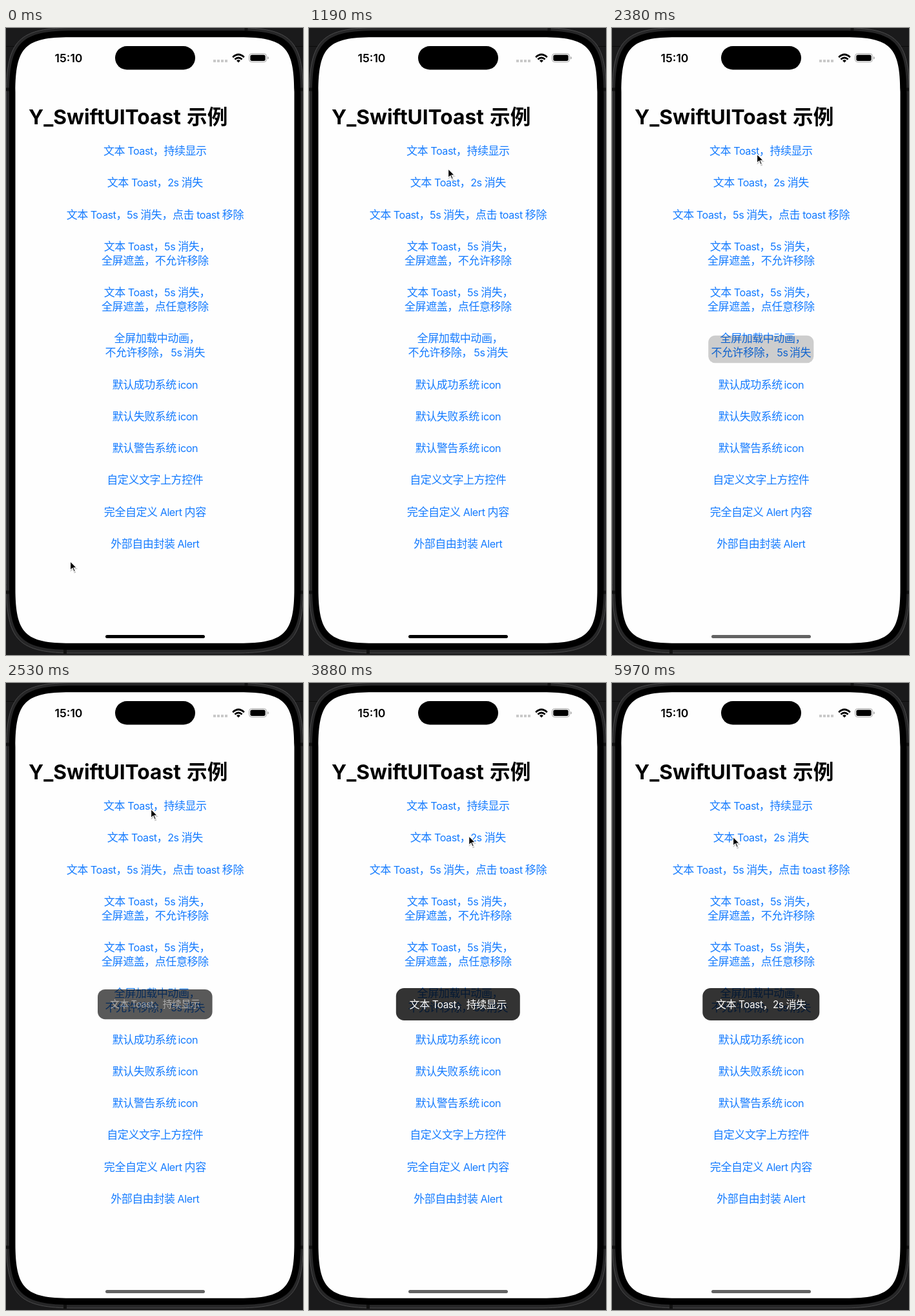
An HTML page that plays this animation: 460 px wide and 970 px high, repeating every 8 s.

```html
<!DOCTYPE html>
<html lang="zh-CN">
<head>
<meta charset="utf-8">
<title>Toast</title>
<style>
html, body { margin: 0; width: 100%; height: 100%; overflow: hidden; background: #1a1a1b; }
svg { display: block; width: 460px; height: 970px; }
text { font-family: "Noto Sans CJK SC", "Noto Sans CJK", sans-serif; white-space: pre; }
.lat { font-family: Inter, sans-serif; font-size: .95em; }
.head { font-weight: 700; font-size: 31.7px; }
.head .lat { font-size: 1em; }
.link { font-size: 17px; letter-spacing: -.45px; fill: #147bff; text-anchor: middle; }
.toast { font-size: 16px; letter-spacing: -.4px; fill: #fff; text-anchor: middle; }
.clock { font-family: Inter, sans-serif; font-weight: 600; font-size: 17.6px; text-anchor: middle; }
</style>
</head>
<body>
<svg viewBox="0 0 460 970">
  <path d="M0 28.5H14M446 28.5H460" stroke="#0c0c0c"/>
  <path id="rim" fill="#262627" stroke="#4b4b4c"/>
  <path d="M0 95H5M456 95H460M0 873H5M456 873H460M372 0V4M91.5 961V968" stroke="#111" stroke-width="5"/>
  <path id="bezel"/>
  <path id="screen" fill="#fefefe"/>
  <rect x="169" y="28" width="124" height="36.5" rx="18.2"/>
  <text class="clock" x="97" y="52.8">15:10</text>
  <path d="M321 51H343" stroke="#c9c9c9" stroke-width="4" stroke-dasharray="4 2"/>
  <g fill="none" stroke="#000" stroke-width="2.7">
    <path d="M351.2 45.2Q360 36.8 368.8 45.2"/>
    <path d="M354.4 48.6Q360 43.4 365.6 48.6"/>
  </g>
  <path d="M357 50.6Q360 48 363 50.6L360 53.6Z"/>
  <rect x="376.5" y="39.7" width="27" height="13" rx="4" fill="none" stroke="#a4a4a4"/>
  <rect x="378.3" y="41.5" width="23.4" height="9.4" rx="2.6"/>
  <path d="M405 44V48.6Q406.7 48 406.7 46.3T405 44" fill="#a4a4a4"/>
  <g id="page"></g>
  <rect id="home" x="154" y="939" width="154" height="5" rx="2.5"/>
  <g id="toast">
    <rect id="box" y="-25" height="50" rx="12.5" fill-opacity=".8"/>
    <text id="msg" class="toast" y="5.8"></text>
  </g>
  <g id="cursor">
    <path d="M0 0V15.8L3.6 12.5L6 18.2L8.8 17L6.5 11.5H11.4Z" transform="translate(.6 1.4)" opacity=".22"/>
    <path d="M.6 1V14.8L3.9 11.7L6.3 17.2L8.3 16.3L6 11H10.5Z" stroke="#fff" stroke-width="1.1"/>
  </g>
</svg>
<script>
const LOOP = 8000, STEP = 148.4, CENTER = 230.8;
const $ = id => document.getElementById(id);
const set = (id, attrs) => Object.entries(attrs).forEach(([k, v]) => $(id).setAttribute(k, v));

// Rounded rectangle whose corners ease into the straight sides.
function squircle(x, y, w, h, r) {
  const e = r * 1.528, c = e * .178, s = w - 2 * e, v = h - 2 * e, k = e - c;
  return `M${x + e} ${y}h${s}c${k} 0 ${e} ${c} ${e} ${e}v${v}c0 ${k} ${-c} ${e} ${-e} ${e}` +
    `h${-s}c${-k} 0 ${-e} ${-c} ${-e} ${-e}v${-v}c0 ${-k} ${c} ${-e} ${e} ${-e}Z`;
}
set('rim', { d: squircle(.5, -.5, 460, 967.5, 69) });
set('bezel', { d: squircle(5, 4, 451.5, 958, 65) });
set('screen', { d: squircle(14.5, 14.2, 432, 937.6, 55.5) });

// Latin runs get their own face.
const mix = s => s.replace(/[\x20-\x7e\u2009]+/g, run => `<tspan class="lat">${run}</tspan>`);

const buttons = [
  '文本 Toast，持续显示',
  '文本 Toast，2s 消失',
  '文本 Toast，5s 消失，点击 toast 移除',
  '文本 Toast，5s 消失，\n全屏遮盖，不允许移除',
  '文本 Toast，5s 消失，\n全屏遮盖，点任意移除',
  '全屏加载中动画，\n不允许移除，\u20095s\u2009消失',
  '默认成功系统\u2009icon',
  '默认失败系统\u2009icon',
  '默认警告系统\u2009icon',
  '自定义文字上方控件',
  '完全自定义 Alert 内容',
  '外部自由封装 Alert'
];

function buildPage() {
  let y = 196, html = `<text class="head" x="35" y="148.6">${mix('Y_SwiftUIToast')}</text>` +
    '<text class="head" x="280" y="148.6">示例</text>';
  for (const label of buttons) {
    label.split('\n').forEach((line, i) => {
      if (i) y += 22;
      // A closing comma hangs past the centred line.
      const x = CENTER + (line.endsWith('，') ? 3 : 0);
      html += `<text class="link" x="${x}" y="${y}">${mix(line)}</text>`;
    });
    y += 49.25;
  }
  $('page').innerHTML = html;
}

// Pointer key points: time, x, y.
const keys = [
  [300, 99, 824], [600, 69, 716], [1190, 215, 217], [1490, 221, 200], [1780, 224, 194],
  [3270, 224, 194], [3720, 254, 228], [3865, 247, 236], [4160, 169, 244], [4620, 228, 246],
  [4900, 224, 241], [5490, 187, 237]
];

function pointer(t) {
  const i = keys.findIndex(k => k[0] > t);
  if (i < 0) return keys[keys.length - 1].slice(1);
  const [t0, x0, y0] = keys[i - 1], [t1, x1, y1] = keys[i];
  const p = (t - t0) / (t1 - t0);
  return [x0 + (x1 - x0) * p, y0 + (y1 - y0) * p];
}

function draw(t) {
  const n = Math.floor((t - 440) / STEP);
  const [x, y] = n < 0 ? keys[0].slice(1) : pointer(450 + n * STEP);
  set('cursor', { transform: `translate(${x} ${y})` });

  const open = t >= 2380;
  const p = Math.min(1, Math.floor((t - 2380) / 150) / 2);
  set('toast', {
    opacity: open ? .24 + .76 * p * (2 - p) : 0,
    transform: `translate(${CENTER} 497) scale(${.85 + .15 * p})`
  });
  set('msg', { opacity: Math.max(0, p) });
  const [label, width] = t < 5970 ? [buttons[0], 192] : [buttons[1], 181];
  set('box', { x: -width / 2, width });
  $('msg').innerHTML = mix(label);

  set('home', { fill: open ? '#636363' : '#000' });
}

buildPage();
const origin = performance.now();
function tick() {
  draw((performance.now() - origin) % LOOP);
  requestAnimationFrame(tick);
}
tick();
</script>
</body>
</html>
```
